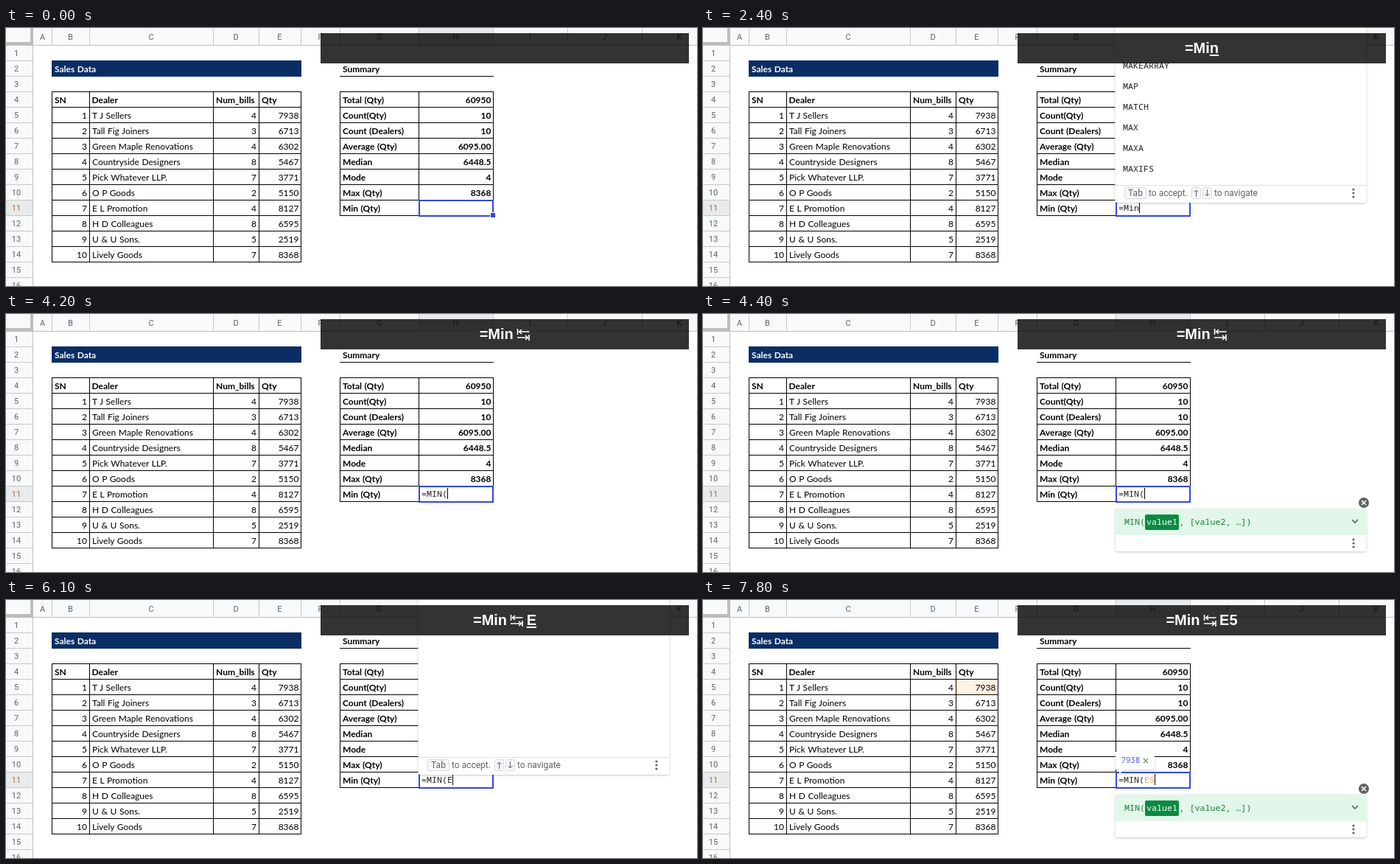
These frames come from a looping animation (938x350 px, 8 s). An HTML page:

```html
<!DOCTYPE html>
<html lang="en">
<head>
<meta charset="utf-8">
<title>MIN formula</title>
<style>
  html, body { margin: 0; width: 938px; height: 350px; overflow: hidden; background: #fff; }
  #stage { position: relative; width: 938px; height: 350px; overflow: hidden; }
  #sheet { position: absolute; left: 0; top: 0; display: block; }
  text { white-space: pre; }
  .head { font: 11px Roboto, sans-serif; fill: #5f6368; text-anchor: middle; }
  .cell { font: 12px Lato, sans-serif; word-spacing: .5px; }
  .bold { font-weight: 700; }
  .right { text-anchor: end; }
  .mono { font: 11.66px "Noto Sans Mono", monospace; fill: #222; }
  .ui { font: 12px Roboto, sans-serif; fill: #5f6368; }
  .panel { filter: drop-shadow(0 1px 1.5px rgba(60, 64, 67, .3)); }
  #keys {
    position: absolute; left: 427px; top: 7px; width: 500px; height: 41px;
    background: rgba(0, 0, 0, .8); color: #fff; text-align: center; white-space: pre;
    font: bold 20px/41px "Liberation Sans", Arial, sans-serif; word-spacing: -1.5px;
  }
  #keys u { text-decoration-thickness: 1.5px; text-underline-offset: 2px; }
  #keys svg { width: 18.5px; height: 16px; vertical-align: -2px; }
</style>
</head>
<body>
<div id="stage">
  <svg id="sheet" width="938" height="350" viewBox="0 0 938 350"></svg>
  <div id="keys"></div>
</div>
<script>
const LOOP = 8000;
const COLS = [37, 62, 113, 281, 343, 400, 453, 560, 661, 762, 863, 965];
const DEALERS = [
  ['T J Sellers', 4, 7938], ['Tall Fig Joiners', 3, 6713], ['Green Maple Renovations', 4, 6302],
  ['Countryside Designers', 8, 5467], ['Pick Whatever LLP.', 7, 3771], ['O P Goods', 2, 5150],
  ['E L Promotion', 4, 8127], ['H D Colleagues', 8, 6595], ['U & U Sons.', 5, 2519],
  ['Lively Goods', 7, 8368]
];
const SUMMARY = [
  ['Total (Qty)', '60950'], ['Count(Qty)', '10'], ['Count (Dealers)', '10'], ['Average (Qty)', '6095.00'],
  ['Median', '6448.5'], ['Mode', '4'], ['Max (Qty)', '8368'], ['Min (Qty)', '']
];
const LIST_M = ['MAKEARRAY', 'MAP', 'MATCH', 'MAX', 'MAXA', 'MAXIFS'];
const LIST_E = ['EQ', 'ERF', 'ERF.PRECISE', 'ERFC', 'ERFC.PRECISE', 'ERROR.TYPE'];

// Each step changes only the listed fields; "show" names the visible layers.
const STEPS = [
  { t: 0, keys: '', mark: 0, cell: '', caret: 0, show: 'handle' },
  { t: 1100, keys: '=', mark: 1 },
  { t: 1200, cell: '=', caret: 1, show: '' },
  { t: 1900, mark: 0, caret: 0 },
  { t: 2300, keys: '=M', mark: 1, cell: '=M', caret: 1, show: 'above' },
  { t: 2400, keys: '=Min', cell: '=Min', show: 'above listM' },
  { t: 2900, show: 'below' },
  { t: 3100, mark: 0, caret: 0 },
  { t: 3700, caret: 1 },
  { t: 4200, keys: '=Min ↹', mark: 1, cell: '=MIN(', show: '' },
  { t: 4300, show: 'hint' },
  { t: 4400, mark: 0 },
  { t: 4700, show: 'hint tip' },
  { t: 5000, caret: 0 },
  { t: 5600, caret: 1 },
  { t: 6000, keys: '=Min ↹ E', mark: 1, cell: '=MIN(E', show: '' },
  { t: 6100, show: 'above' },
  { t: 6200, show: 'above listE' },
  { t: 6400, mark: 0 },
  { t: 6800, caret: 0 },
  { t: 7400, caret: 1 },
  { t: 7600, keys: '=Min ↹ E5', mark: 1, cell: '=MIN(E5', show: '' },
  { t: 7700, show: 'hint value' },
  { t: 7800, mark: 0 }
];
STEPS.forEach((s, i) => { STEPS[i] = { ...STEPS[i - 1], ...s }; });

const esc = s => String(s).replace(/&/g, '&amp;').replace(/</g, '&lt;');
const rect = (x, y, w, h, fill, more = '') =>
  `<rect x="${x}" y="${y}" width="${w}" height="${h}" fill="${fill}" ${more}/>`;
const text = (x, y, s, cls, more = '') => `<text x="${x}" y="${y}" class="${cls}" ${more}>${esc(s)}</text>`;
const path = (d, stroke, w = 1) => `<path d="${d}" fill="none" stroke="${stroke}" stroke-width="${w}"/>`;
const layer = (id, body, cls = '') => `<g id="${id}" class="layer ${cls}">${body}</g>`;
const rowTop = n => 23 + 21 * (n - 1);
const dots = y => [0, 5, 10].map(d => `<circle cx="883" cy="${y + d}" r="1.6" fill="#5f6368"/>`).join('');
const closer = '<circle cx="897" cy="256" r="7" fill="#5f6368"/>' + path('M894 253l6 6m0-6l-6 6', '#fff', 1.6);

function headers() {
  let out = rect(0, 0, 938, 23, '#f8f9fa') + rect(0, 23, 36, 327, '#f8f9fa') +
    rect(560, 0, 101, 23, '#e8eaed') + rect(0, 234, 36, 20, '#e8eaed');
  for (let i = 0; i < 11; i++) {
    out += rect(COLS[i + 1], 0, 1, 23, '#c6c8ca') +
      text((COLS[i] + COLS[i + 1]) / 2, 16, 'ABCDEFGHIJK'[i], 'head');
  }
  for (let n = 1; n <= 16; n++) {
    out += rect(0, rowTop(n + 1), 36, 1, '#c6c8ca') +
      text(14, rowTop(n) + 15, n, 'head', n === 11 ? 'style="fill:#a56f3f"' : '');
  }
  return out + rect(0, 23, 938, 1, '#c0c0c0') + rect(36, 0, 1, 350, '#c0c0c0') +
    rect(33, 0, 4, 24, '#bdbdbd') + rect(0, 19, 37, 5, '#bdbdbd');
}

function grid(xs, rows) {
  const [x0, x1] = [xs[0], xs[xs.length - 1]];
  let out = xs.map(x => rect(x, 86, 1, rows * 21 + 1, '#000')).join('');
  for (let r = 0; r <= rows; r++) out += rect(x0, 86 + 21 * r, x1 - x0 + 1, 1, '#000');
  return out;
}

function tables() {
  let out = rect(62, 44, 339, 22, '#0a2d64') + text(66, 60, 'Sales Data', 'cell bold', 'fill="#fff"') +
    text(457, 60, 'Summary', 'cell bold') + rect(453, 65, 209, 1, '#000');
  out += layer('tint', rect(344, 108, 56, 20, '#fef2e2'));
  out += grid([62, 113, 281, 343, 400], 11) + grid([453, 560, 661], 8);
  [[66, 'SN'], [116.5, 'Dealer'], [285, 'Num_bills'], [347, 'Qty']]
    .forEach(([x, s]) => { out += text(x, 102, s, 'cell bold'); });
  DEALERS.forEach(([name, bills, qty], i) => {
    const y = 123 + 21 * i;
    out += text(110, y, i + 1, 'cell right') + text(117, y, name, 'cell') +
      text(340, y, bills, 'cell right') + text(397.5, y, qty, 'cell right');
  });
  SUMMARY.forEach(([name, value], i) => {
    const y = 102 + 21 * i;
    out += text(457, y, name, 'cell bold') + text(658.5, y, value, 'cell bold right');
  });
  return out;
}

const editor = () =>
  rect(561, 234, 100, 21, '#fff', 'stroke="#3249dc" stroke-width="2"') +
  layer('handle', rect(657, 250, 8, 8, '#fff') + rect(658, 251, 6, 6, '#3249dc')) +
  '<text id="formula" class="mono" x="564" y="248"></text>' + rect(0, 236, 1, 15, '#000', 'id="caret"');

const names = list => list.map((s, i) => text(570, 55 + 28 * i, s, 'mono')).join('');
const keycap = (x, w, s) =>
  rect(x + .5, 216.5, w, 15, '#f8f9fa', 'rx="2" stroke="#d5d7da"') +
  text(x + .5 + w / 2, 228, s, 'ui', 'text-anchor="middle"');

function popups() {
  const above = rect(559.5, -60, 341, 297, '#fff', 'class="panel" rx="3"') + rect(560, 213, 340, 1, '#e0e0e0') +
    keycap(572, 29, 'Tab') + text(605, 228, 'to accept.', 'ui') +
    keycap(663, 12, '') + keycap(678, 12, '') +
    path('M669.5 229v-9m-3 3l3-3l3 3M684.5 219v9m-3-3l3 3l3-3', '#5f6368') +
    text(694, 228, 'to navigate', 'ui') + dots(219);
  const below = rect(559.5, 264, 341, 120, '#fff', 'class="panel"') + text(570, 277, 'MIN', 'mono') +
    text(570, 297, 'Minimum value in a numerical dataset.', 'ui', 'style="fill:#777b80"') +
    text(570, 323, 'MINA', 'mono') + text(570, 351, 'MINUS', 'mono') + closer;
  const green = 'style="fill:#188038"';
  const hint = rect(559.5, 264, 341, 58, '#fff', 'class="panel" rx="3"') +
    rect(559, 264, 342, 36, '#e2f6e9') + text(572, 286, 'MIN(', 'mono bold', green) +
    rect(600, 272, 46, 21, '#0b8a43', 'rx="2"') + text(602, 286, 'value1', 'mono bold', 'style="fill:#fff"') +
    text(646.5, 286, ', [value2, …])', 'mono bold', green) +
    path('M881 279l4 4l4-4', '#4f6a59', 1.6) + dots(306) + closer;
  const tip = '<path d="M599 254l7-6l7 6z" fill="#2b2b2b"/>' + rect(496, 253, 215, 42, '#2b2b2b', 'rx="1"') +
    text(505, 271, 'Use the arrow keys to select a range.', 'ui', 'style="fill:#fff;font-weight:500"') +
    text(505, 285, 'Learn more about range selection.', 'ui', 'style="fill:#2a14cc"');
  const value = '<path class="panel" d="M560 206h53v24h-40l-8 6v-6h-5z" fill="#fff"/>' +
    text(567.5, 221, '7938', 'mono', 'style="fill:#4962df;font-size:10.7px"') +
    path('M598 215l6 6m0-6l-6 6', '#80868b', 1.1);
  return layer('above', above) + layer('listM', names(LIST_M)) + layer('listE', names(LIST_E)) +
    layer('below', below) + layer('hint', hint) + layer('tip', tip) + layer('value', value);
}

const $ = id => document.getElementById(id);
$('sheet').innerHTML = headers() + tables() + editor() + popups();
const layers = [...document.querySelectorAll('.layer')];
const TAB = '<svg viewBox="0 0 18.5 16"><path d="M1.5 0v8M3 4h14.5M7 1L3.5 4L7 7M17 8v8M1 12h14.5M12 9l3.5 3l-3.5 3" ' +
  'fill="none" stroke="#fff" stroke-width="1.6"/></svg>';

function keyMarkup({ keys, mark }) {
  const html = mark ? `${keys.slice(0, -1)}<u>${keys.slice(-1)}</u>` : keys;
  return html.replace('↹', TAB);
}

function render(s) {
  $('keys').innerHTML = keyMarkup(s);
  $('formula').innerHTML = s.cell.replace('E5', '<tspan fill="#e5a344">E5</tspan>');
  $('caret').setAttribute('x', 564 + 7 * s.cell.length);
  $('caret').style.display = s.caret ? '' : 'none';
  const on = s.show.split(' ');
  if (on.includes('value')) on.push('tint');
  layers.forEach(g => { g.style.display = on.includes(g.id) ? '' : 'none'; });
}

let shown;
const start = performance.now();
function tick() {
  const t = (performance.now() - start) % LOOP;
  const step = STEPS.findLast(s => s.t <= t) || STEPS[0];
  if (step !== shown) render(shown = step);
  requestAnimationFrame(tick);
}
tick();
</script>
</body>
</html>
```
